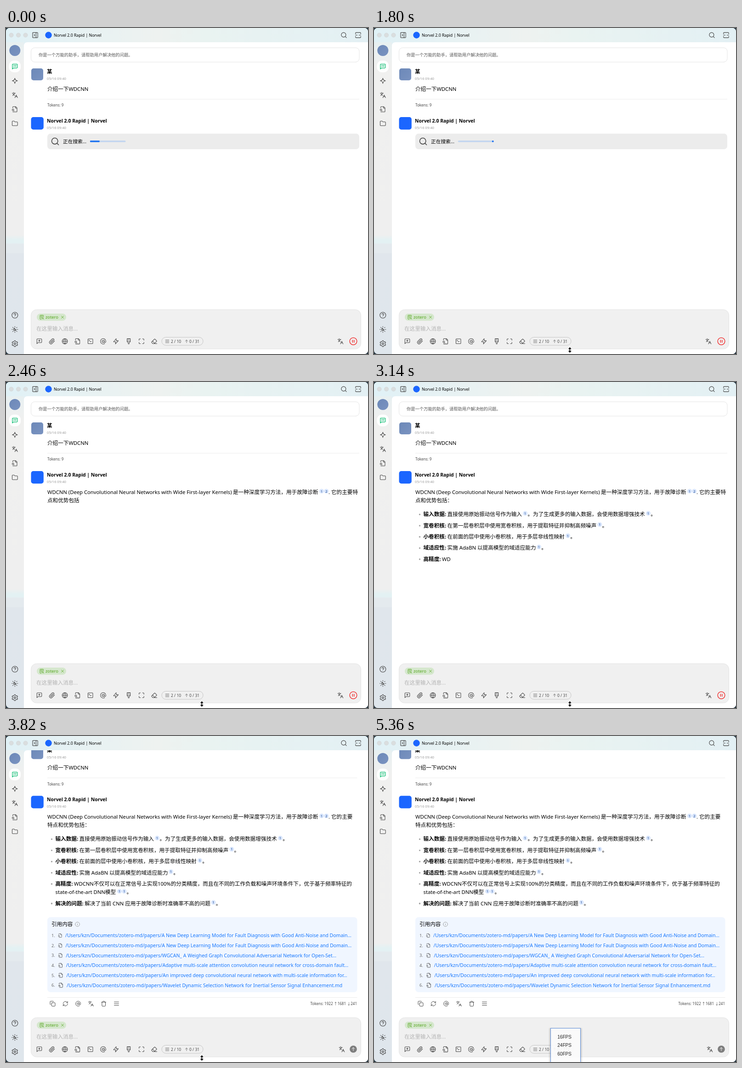
Animation of 788x710 px, one loop 5.42 s. Source, as an HTML page:

```html
<!DOCTYPE html>
<html lang="zh-CN">
<head>
<meta charset="utf-8">
<style>
html, body { margin: 0; width: 100%; height: 100%; overflow: hidden; background: #22323d; }
svg { display: block; }
text { font-family: "Noto Sans", "Noto Sans CJK SC", "Noto Sans CJK JP", sans-serif; white-space: pre; }
.menu text { font-family: "Liberation Sans", sans-serif; }
</style>
</head>
<body>
<svg id="stage" width="788" height="710" viewBox="0 0 788 710"></svg>
<script>
const LOOP = 5420, SCROLL_AT = 3820, CJK = 11.6, LEFT = 107.5;
const MODEL = 'Norvel 2.0 Rapid | Norvel';
const BLUE = '#1677ff', INK = '#000', GREY = '#454545';

// Shape helpers; text is placed by its left edge and vertical centre.
const text = (x, y, s, size = CJK, fill = INK, extra = '') =>
  `<text x="${x}" y="${y + size * .36}" font-size="${size}" fill="${fill}" ${extra}>` +
  s.replace(/[\x20-\x7e…↑↓]+/g, m => `<tspan font-size="${size * .97}">${m}</tspan>`) + '</text>';
const rect = (x, y, w, h, r, fill, extra = '') =>
  `<rect x="${x}" y="${y}" width="${w}" height="${h}" rx="${r}" fill="${fill}" ${extra}/>`;
const disc = (x, y, r, fill, extra = '') => `<circle cx="${x}" cy="${y}" r="${r}" fill="${fill}" ${extra}/>`;
const rule = (x1, x2, y) => `<path d="M${x1} ${y}H${x2}" stroke="#ececec"/>`;
const during = (from, to, body) => `<g data-from="${from}" data-to="${to}">${body}</g>`;
const ring = (x, y, r) => `M${x - r} ${y}a${r} ${r} 0 1 0 ${2 * r} 0a${r} ${r} 0 1 0 ${-2 * r} 0`;
const box = (x, y, w, h) => `M${x + 2} ${y}h${w - 4}q2 0 2 2v${h - 4}q0 2-2 2h${4 - w}q-2 0-2-2v${4 - h}q0-2 2-2z`;

const rays = Array.from({ length: 8 }, (_, i) => {
  const a = i * Math.PI / 4, c = Math.cos(a), s = Math.sin(a);
  return `M${12 + 8 * c} ${12 + 8 * s}L${12 + 10 * c} ${12 + 10 * s}`;
}).join('');
// Six broad teeth with rounded valleys between them
const gear = Array.from({ length: 6 }, (_, i) => {
  const at = (turn, r) => {
    const a = (i + turn) * Math.PI / 3;
    return `${12 + r * Math.sin(a)} ${12 - r * Math.cos(a)}`;
  };
  return `${i ? 'L' : 'M'}${at(-.16, 10)}Q${at(0, 10.4)} ${at(.16, 10)}L${at(.27, 8.3)}Q${at(.5, 6.6)} ${at(.73, 8.3)}`;
}).join('') + 'z';
const bubble = 'M21 15a2 2 0 0 1-2 2H7l-4 4V5a2 2 0 0 1 2-2h14a2 2 0 0 1 2 2z';

// Outlines on a 24-unit grid
const icons = {
  search: ring(11, 11, 8) + 'M21 21l-4.3-4.3',
  panel: box(3, 3, 18, 18) + 'M15 3v18M8 9l3 3-3 3',
  width: 'M3 8V5q0-2 2-2h14q2 0 2 2v3M3 16v3q0 2 2 2h14q2 0 2-2v-3M3 12h6M15 12h6',
  chat: bubble + 'M8 12a2 2 0 0 0 2-2V8H8M14 12a2 2 0 0 0 2-2V8h-2',
  newChat: bubble + 'M12 7v6M9 10h6',
  sparkle: 'M12 2q1 9 10 10q-9 1-10 10q-1-9-10-10q9-1 10-10z',
  translate: 'M5 8l6 6M4 14l6-6 2-3M2 5h12M7 2h1M22 22l-5-10-5 10M14 18h6',
  file: 'M14 2v4a2 2 0 0 0 2 2h4M4.3 21a2 2 0 0 0 1.7 1H18a2 2 0 0 0 2-2V7l-5-5H6a2 2 0 0 0-2 2v3M9 18l-1.5-1.5' + ring(5, 14, 3),
  library: 'M20 9V4q0-2-2-2H5q-2 0-2 2v16q0 2 2 2h4M7 7h9M7 12h3M21 22l-2.5-2.5' + ring(15.5, 16, 4),
  folder: 'M20 20a2 2 0 0 0 2-2V8a2 2 0 0 0-2-2h-8l-2.5-3H4a2 2 0 0 0-2 2v13a2 2 0 0 0 2 2z',
  help: ring(12, 12, 10) + 'M9 9a3 3 0 0 1 6 1c0 2-3 3-3 3M12 17h.01',
  info: ring(12, 12, 10) + 'M12 16v-5M12 8h.01',
  sun: 'M12 8a2.8 2.8 0 1 0 4 4a4 4 0 1 1-4-4' + rays,
  gear: gear + ring(12, 12, 3),
  clip: 'M21.4 11l-9.2 9.2a6 6 0 0 1-8.5-8.5l8.6-8.6a4 4 0 1 1 5.7 5.7l-8.6 8.6a2 2 0 0 1-2.8-2.8l8.5-8.5',
  globe: ring(12, 12, 10) + 'M2 12h20M12 2a14.5 14.5 0 0 0 0 20a14.5 14.5 0 0 0 0-20',
  terminal: box(3, 3, 18, 18) + 'M7 11l2-2-2-2M11 13h4',
  at: ring(12, 12, 4) + 'M16 8v5a3 3 0 0 0 6 0v-1a10 10 0 1 0-4 8',
  zap: 'M13 2L3 14h8l-1 8L21 10h-8z',
  brush: 'M6 2h12v9H6zM10 2v4M14 2v3M6 11v2q0 2 2 2h2v5a2 2 0 0 0 4 0v-5h2q2 0 2-2v-2',
  maximize: 'M8 3H5q-2 0-2 2v3M21 8V5q0-2-2-2h-3M3 16v3q0 2 2 2h3M16 21h3q2 0 2-2v-3',
  eraser: 'M7 21l-4.3-4.3q-1.4-1.4 0-2.8l9.6-9.6q1.4-1.4 2.8 0l5.6 5.6q1.4 1.4 0 2.8L12 21M22 21H7M5 11l9 9',
  menu: 'M3 5h18M3 12h18M3 19h18',
  up: 'M12 20V4M5 11l7-7 7 7',
  close: 'M5 5l14 14M19 5L5 19',
  copy: box(8, 8, 14, 14) + 'M4 16q-2 0-2-2V4q0-2 2-2h10q2 0 2 2',
  refresh: 'M3 12a9 9 0 0 1 9-9a9.8 9.8 0 0 1 7 3l2 2M21 3v5h-5M21 12a9 9 0 0 1-9 9a9.8 9.8 0 0 1-7-3l-2-2M8 16H3v5',
  trash: 'M3 6h18M19 6v14q0 2-2 2H7q-2 0-2-2V6M8 6V4q0-2 2-2h4q2 0 2 2v2'
};
const icon = (name, x, y, size = 14, color = GREY, weight = 1.8) =>
  `<path d="${icons[name]}" transform="translate(${x - size / 2} ${y - size / 2}) scale(${size / 24})" fill="none"
    stroke="${color}" stroke-width="${weight}" stroke-linecap="round" stroke-linejoin="round"/>`;

const cite = (x, y, n = 1) => disc(x, y, 5, '#d9e6fc') +
  text(x, y, String(n), 7.8, '#12408c', 'text-anchor="middle" font-weight="500"');
const dot = y => disc(99.5, y + .5, 1.7, '#a5a5a5');
const bullet = (y, label, body) => dot(y) + text(LEFT, y, label + ':', CJK, INK, 'font-weight="700"') +
  text(LEFT + label.length * CJK + 5.7, y, body);
const citedEnd = (x, y) => cite(x, y - 2) + text(x + 5.3, y, '。');

function chrome() {
  return `<defs>
    <linearGradient id="bar"><stop stop-color="#e0f1f6"/><stop offset=".42" stop-color="#eef2f0"/>
      <stop offset=".55" stop-color="#e9f3f1"/><stop offset="1" stop-color="#e3f0f4"/></linearGradient>
    <linearGradient id="side" x2="0" y2="1"><stop stop-color="#e5f1f4"/><stop offset=".12" stop-color="#f0f0ef"/>
      <stop offset=".635" stop-color="#efefef"/><stop offset=".65" stop-color="#e3f1f3"/><stop offset=".66" stop-color="#e3f1f3"/>
      <stop offset=".662" stop-color="#e4eaee"/><stop offset=".69" stop-color="#e4eaee"/><stop offset=".692" stop-color="#e0e6ec"/>
      <stop offset="1" stop-color="#dfe6ec"/></linearGradient>
    <linearGradient id="photo" x2="1" y2="1"><stop stop-color="#6c88b8"/><stop offset="1" stop-color="#7a93c0"/></linearGradient>
    <clipPath id="window"><rect width="788" height="710" rx="8"/></clipPath>
    <clipPath id="view"><rect x="39" y="31" width="749" height="580"/></clipPath></defs>` +
    rect(0, 0, 788, 710, 0, 'url(#side)') + rect(0, 0, 788, 40, 0, 'url(#bar)') +
    rect(0, 31, 39, 10, 0, '#e8f0f1') +
    '<path d="M39 710V39q0-8 8-8H788V710z" fill="#fff"/>' +
    [11.5, 27, 42.5].map(x => disc(x, 15.5, 4.6, '#dadedf', 'stroke="#cdd1d2" stroke-width=".6"')).join('') +
    icon('panel', 63.5, 15.5, 15) + disc(92.5, 15.5, 7.2, '#1b66ff') +
    text(104, 15.5, MODEL, 9, INK, 'font-weight="500"') +
    icon('search', 735.5, 15.5, 15) + icon('width', 766.5, 15.5, 15) +
    disc(19.3, 49, 12, 'url(#photo)') + rect(6.5, 71, 25.5, 25.5, 11, '#fff') +
    icon('chat', 19.3, 84, 14.5, '#00b96b', 2) +
    ['sparkle', 'translate', 'file', 'folder'].map((n, i) => icon(n, 19.3, 115 + 31 * i)).join('') +
    ['help', 'sun', 'gear'].map((n, i) => icon(n, 19.3, 625.5 + 31 * i, 15.5)).join('');
}

function conversation() {
  const stamp = y => text(89, y, '05/16 09:40', 7.9, '#999');
  return rect(54.5, 43, 714.5, 31.2, 8, '#fff', 'stroke="#e4e4e4"') +
    text(71, 59, '你是一个万能的助手，请帮助用户解决他的问题。', 9.3, '#555') +
    rect(55, 88, 26, 26, 5, 'url(#photo)') +
    text(89, 95, '某', CJK, INK, 'font-weight="700"') + stamp(110) + text(90, 132.5, '介绍一下WDCNN') +
    during(0, SCROLL_AT, rule(90, 769, 155)) + during(SCROLL_AT, LOOP, rule(90, 764.5, 155)) +
    text(90, 168.5, 'Tokens: 9', 8.3, '#444') +
    rect(54.5, 194, 27.3, 27.3, 5, '#1b66ff') +
    text(89, 202, MODEL, 10.75, INK, 'font-weight="700"') + stamp(217) +
    during(0, 2400, searching()) + answer();
}

function searching() {
  return rect(90, 230, 679, 34, 7, '#ececec') + icon('search', 107, 247, 20, '#444', 1.9) +
    text(124, 247, '正在搜索...', 10.7, INK, 'font-weight="500"') +
    rect(183, 245.3, 77.5, 3.1, 1.5, '#c1d5f0') +
    '<rect class="runner" y="245.3" height="3.1" rx="1" fill="#1a70f0"/>'.repeat(2);
}

function answer() {
  const precision = 'WDCNN不仅可以在正常信号上实现100%的分类精度，而且在不同的工作负载和噪声环境条件下，优于基于频率特征的';
  return during(2460, LOOP,
      text(90, 239.5, 'WDCNN (Deep Convolutional Neural Networks with Wide First-layer Kernels)') +
      text(494, 239.5, '是一种深度学习方法，用于故障诊断') + cite(687, 237.8) + cite(697.3, 237.8, 2) + text(702, 239.5, '.')) +
    during(2460, SCROLL_AT, text(708, 239.5, '它的主要特') + text(90, 258, '点和优势包括')) +
    during(2710, SCROLL_AT, text(159.6, 258, '：')) +
    during(SCROLL_AT, LOOP, text(708, 239.5, '它的主要') + text(90, 258, '特点和优势包括：')) +
    during(2710, LOOP, bullet(288, '输入数据', '直接使用原始振动信号作为输入') + cite(329, 286) +
      text(334.5, 288, '。为了生成更多的输入数据，会使用数据增强技术') + citedEnd(597, 288)) +
    during(2830, LOOP, bullet(312.4, '宽卷积核', '在第一层卷积层中使用宽卷积核，用于提取特征并抑制高频噪声') + citedEnd(491.3, 312.4)) +
    during(3140, LOOP, bullet(336.8, '小卷积核', '在前面的层中使用小卷积核，用于多层非线性映射') + citedEnd(422, 336.8) +
      bullet(361.2, '域适应性', '实施 AdaBN 以提高模型的域适应能力') + citedEnd(359, 361.2)) +
    during(3140, 3390, bullet(385.5, '高精度', 'WD')) +
    during(3390, LOOP, bullet(385.5, '高精度', precision) + text(LEFT, 404, 'state-of-the-art DNN模型') +
      cite(247, 402) + citedEnd(257.3, 404) + dot(428)) +
    during(3760, LOOP, bullet(428.2, '解决的问题', '解决了当前 CNN 应用于故障诊断时准确率不高的问题') + citedEnd(451.5, 428.2));
}

function references() {
  const papers = [
    'A New Deep Learning Model for Fault Diagnosis with Good Anti-Noise and Domain…',
    'A New Deep Learning Model for Fault Diagnosis with Good Anti-Noise and Domain…',
    'WGCAN_ A Weighed Graph Convolutional Adversarial Network for Open-Set…',
    'Adaptive multi-scale attention convolution neural network for cross-domain fault…',
    'An improved deep convolutional neural network with multi-scale information for…',
    'Wavelet Dynamic Selection Network for Inertial Sensor Signal Enhancement.md'];
  return rect(90, 394.5, 674.5, 163.5, 7, '#f0f6ff') + text(99, 410, '引用内容') +
    icon('info', 155.5, 410, 11.5, '#8a8a8a', 1.6) +
    papers.map((p, i) => {
      const y = 434.6 + 21.65 * i;
      return text(99, y, `${i + 1}.`, 9.5, '#666') + icon('file', 118 + i * .3, y, 9.5 + i * .4) +
        text(129 + i * .6, y, '/Users/kzn/Documents/zotero-md/papers/' + p, 10.8, BLUE);
    }).join('') + rule(90, 764.5, 569.5) +
    ['copy', 'refresh', 'at', 'translate', 'trash', 'menu'].map((n, i) => icon(n, 101.5 + 27.8 * i, 583, 13)).join('') +
    text(764, 583, 'Tokens: 1922 ↑1681 ↓241', 8.3, '#444', 'text-anchor="end"');
}

function composer() {
  const tools = ['newChat', 'clip', 'globe', 'file', 'terminal', 'at', 'zap', 'brush', 'maximize', 'eraser'];
  const counter = (width, count) =>
    rect(339, 673.5, width, 17.5, 8.75, 'none', 'stroke="#c6c6c6"') + text(399, 682.5, '0 / ' + count, 8.8, GREY);
  return rect(54.5, 613.5, 718, 85.5, 12, '#f0f0f0', 'stroke="#e3e3e3"') +
    rect(67, 622, 64, 15.5, 7.75, '#d5e7cd') + icon('library', 78, 629.8, 10.5, '#52a41a', 2) +
    text(86, 629.8, 'zotero', 9.6, '#52a41a') + icon('close', 123, 629.8, 8.5, '#52a41a', 2.2) +
    text(66, 655, '在这里输入消息...', CJK, '#b3b3b3') +
    tools.map((n, i) => icon(n, 72.5 + 27.8 * i, 682.3)).join('') +
    icon('menu', 351, 682.5, 10) + text(359, 682.5, '2 / 10', 8.8, GREY) + icon('up', 393, 682.5, 9) +
    during(0, 3940, counter(90, '31')) + during(3940, LOOP, counter(95, '272')) +
    during(0, SCROLL_AT, icon('translate', 728, 682.3) + disc(756, 682.3, 7.8, 'none', 'stroke="#f03535" stroke-width="1.5"') +
      '<path d="M754.3 679.3v6M757.7 679.3v6" stroke="#f03535" stroke-width="1.5"/>') +
    during(SCROLL_AT, LOOP, icon('translate', 731, 682.3) + disc(756, 682, 7.8, '#7d7d7d') +
      icon('up', 756, 682, 10.5, '#fff', 2.2));
}

function frameRateMenu() {
  const labels = ['16FPS', '24FPS', '60FPS'].map((s, i) => text(399.3, 655 + 18.5 * i, s, 10.3, '#222'));
  const shadow = [4, 3, 2, 1].map(d => rect(384 - d, 637 - d / 2, 66 + 2 * d, 90, d, '#000', 'opacity=".035"'));
  return `<g class="menu">${shadow.join('')}` +
    rect(384.5, 636.5, 65, 80, 0, '#fff', 'id="menuFill" stroke="#5f8fdc"') + labels.join('') + '</g>';
}

const pointer = '<path id="pointer" d="M0-6l3.6 4H.8V2H3.6L0 6-3.6 2H-.8V-2H-3.6z" stroke="#fff" stroke-width="1.2" paint-order="stroke"/>';

const stage = document.getElementById('stage');
stage.innerHTML = `<g clip-path="url(#window)">${chrome()}
  <g clip-path="url(#view)"><g id="scroller">${conversation()}</g>${during(SCROLL_AT, LOOP, references())}</g>
  ${composer()}${during(540, 5000, pointer)}${during(5180, LOOP, frameRateMenu())}</g>`;

const timed = [...stage.querySelectorAll('[data-from]')];
const runners = stage.querySelectorAll('.runner');
const byId = id => document.getElementById(id);
const [scroller, cursor, menuFill] = ['scroller', 'pointer', 'menuFill'].map(byId);

function bezier(x, x1, y1, x2, y2) {
  const at = (s, a, b) => 3 * (1 - s) ** 2 * s * a + 3 * (1 - s) * s * s * b + s ** 3;
  let lo = 0, hi = 1;
  for (let i = 0; i < 24; i++) {
    const mid = (lo + hi) / 2;
    if (at(mid, x1, x2) < x) lo = mid; else hi = mid;
  }
  return at(lo, y1, y2);
}

// Each runner crosses the track in 60% of its period, then waits.
function placeRunner(el, time, curve, [left0, left1], right1) {
  const phase = time < 0 ? 0 : Math.min(1, time % 2100 / 1260);
  const p = bezier(phase, ...curve), clamp = v => Math.max(0, Math.min(1, v));
  const left = clamp(left0 + (left1 - left0) * p), right = clamp(right1 * p);
  el.setAttribute('x', 183 + 77.5 * left);
  el.setAttribute('width', 77.5 * (right - left));
}

function draw() {
  const t = performance.now() % LOOP;
  for (const el of timed) el.style.display = t >= +el.dataset.from && t < +el.dataset.to ? '' : 'none';
  const tick = Math.floor(t / 60) * 60 + 147;
  placeRunner(runners[0], tick, [.65, .815, .735, .395], [-.35, 1], 1.9);
  placeRunner(runners[1], tick - 1150, [.165, .84, .44, 1], [-2, 1.07], 1.08);
  scroller.setAttribute('transform', `translate(0 ${t < SCROLL_AT ? 0 : -63.8})`);
  cursor.setAttribute('transform', `translate(426.3 ${t < 660 ? 702 : t < 4940 ? 701.2 : 707})`);
  menuFill.setAttribute('fill-opacity', t < 5360 ? 1 : .9);
  requestAnimationFrame(draw);
}
draw();
</script>
</body>
</html>
```
